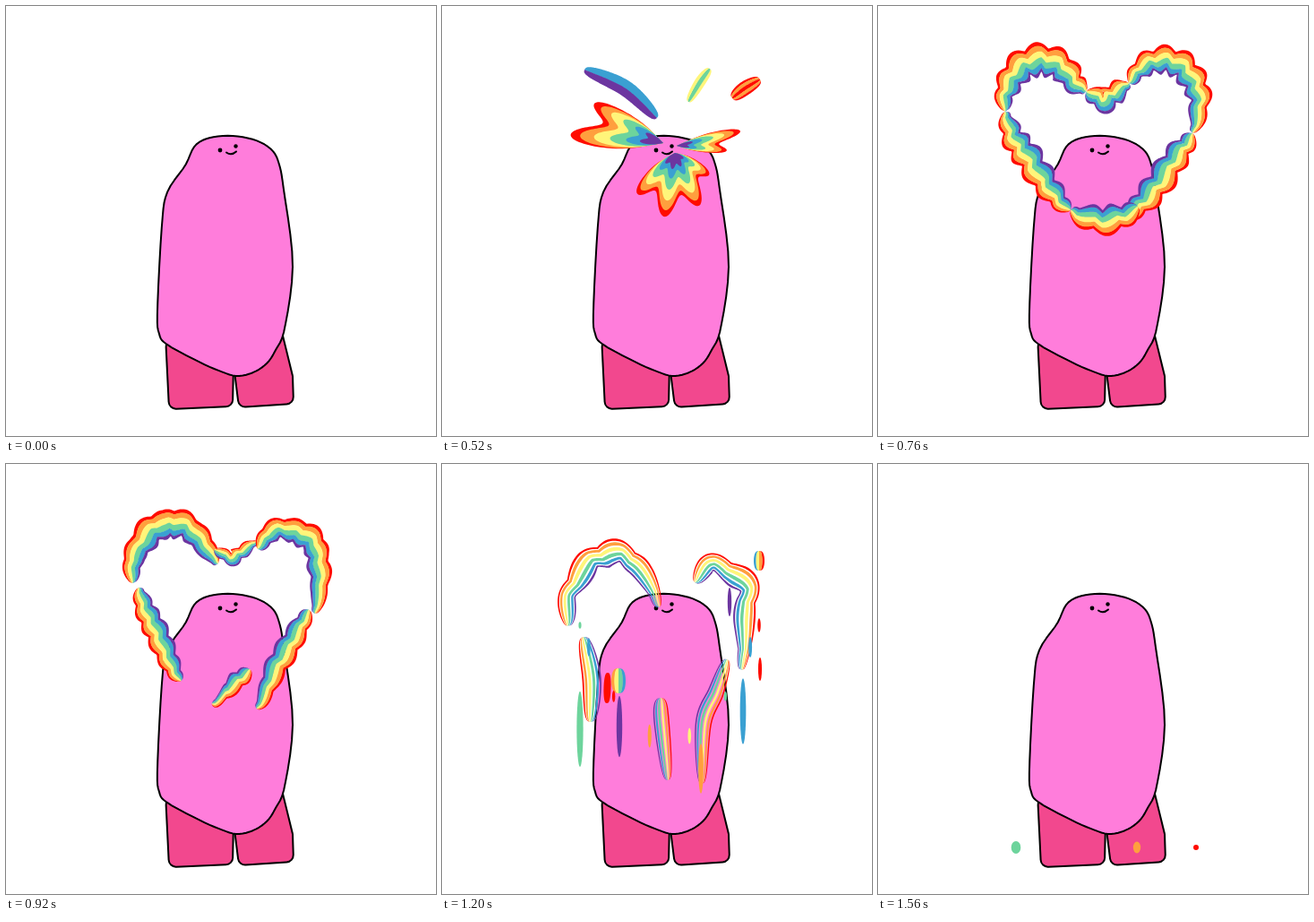
An HTML page with a canvas for the animation above (1640 ms loop, 480 by 480 pixels).

```html
<!DOCTYPE html>
<html lang="en">
<head>
<meta charset="utf-8">
<title>Rainbow heart</title>
<style>
  html, body { margin: 0; width: 100%; height: 100%; overflow: hidden; background: #fff; }
  canvas { display: block; }
</style>
</head>
<body>
<canvas id="stage" width="480" height="480"></canvas>
<script>
const ctx = document.getElementById('stage').getContext('2d');
const LOOP = 1640, STEP = 40, N = 100;
const RED = '#ff0c00', ORANGE = '#ff9f3e', YELLOW = '#fff57a',
      GREEN = '#6dd49c', BLUE = '#3aa0d2', PURPLE = '#6c35a0', PINK = '#ff7ddb';
const RAINBOW = [RED, ORANGE, YELLOW, GREEN, BLUE, PURPLE];

const { PI, sin, cos } = Math;
const clamp = v => Math.max(0, Math.min(1, v));
const ramp = (t, a, b) => clamp((t - a) / (b - a));
const ease = v => v * v * (3 - 2 * v);
const mix = (a, b, k) => a + (b - a) * k;
const mixPoints = (a, b, k) => a.map((p, i) => [mix(p[0], b[i][0], k), mix(p[1], b[i][1], k)]);
const pairs = flat => flat.flatMap((v, i) => i % 2 ? [] : [[v, flat[i + 1]]]);
// Stripe borders: the outermost stripes are the thinnest
const border = f => mix(f, ease(f), .5);

// Catmull-Rom curve between two positions counted in key points
function spline(points, closed = false, from = 0, to = points.length - !closed) {
  const count = points.length;
  const key = i => points[closed ? (i + count) % count : Math.max(0, Math.min(count - 1, i))];
  return Array.from({ length: N + 1 }, (_, k) => {
    const u = mix(from, to, k / N), i = Math.floor(u), f = u - i;
    const [a, b, c, d] = [i - 1, i, i + 1, i + 2].map(key);
    return [0, 1].map(j => b[j] + f / 2 * (c[j] - a[j] + f * (2 * a[j] - 5 * b[j] + 4 * c[j] - d[j]
      + f * (3 * (b[j] - c[j]) + d[j] - a[j]))));
  });
}

function shape(points, fill, stroke) {
  ctx.beginPath();
  points.forEach(p => ctx.lineTo(...p));
  ctx.closePath();
  ctx.fillStyle = fill;
  ctx.fill();
  if (stroke) ctx.stroke();
}

function rounded(points, radius, fill) {
  const last = points[points.length - 1];
  ctx.beginPath();
  ctx.moveTo((points[0][0] + last[0]) / 2, (points[0][1] + last[1]) / 2);
  points.forEach((p, i) => ctx.arcTo(...p, ...points[(i + 1) % points.length], radius));
  ctx.closePath();
  ctx.fillStyle = fill;
  ctx.fill();
  ctx.stroke();
}

function oval(x, y, rx, ry, fill) {
  ctx.beginPath();
  ctx.ellipse(x, y, rx, ry, 0, 0, 2 * PI);
  ctx.fillStyle = fill;
  ctx.fill();
}

// Both edges of a tapered ribbon around a middle line, with optional scallops
function edges(mid, half, scallops = 0) {
  const side = (sign, phase) => mid.map(([x, y], i) => {
    const a = mid[Math.max(0, i - 1)], b = mid[Math.min(N, i + 1)];
    const dx = b[0] - a[0], dy = b[1] - a[1], s = i / N;
    const bump = scallops && 7 * Math.abs(sin(PI * (scallops * s + phase))) - 4;
    const w = sign * Math.max(0, sin(PI * s)) ** .4 * (half + bump) / (Math.hypot(dx, dy) || 1);
    return [x + dy * w, y - dx * w];
  });
  return [side(1, 0), side(-1, .3)];
}

function bands([outer, inner], colors = RAINBOW, fullness = 1) {
  const n = colors.length;
  colors.forEach((color, i) => {
    const from = border((i + .5 - .5 * fullness) / n);
    const to = border(Math.min(1, (i + .5 + .56 * fullness) / n));
    shape([...mixPoints(outer, inner, from), ...mixPoints(outer, inner, to).reverse()], color);
  });
}

const leaf = (flat, half, colors) => bands(edges(spline(pairs(flat)), half), colors);

const BODY = pairs([
  253,145, 228,147, 211,156, 200,178, 180,208, 174,245, 169,340, 171,366, 180,378, 215,397,
  240,408, 258,413, 276,409, 291,399, 301,384, 311,360, 320,288, 310,205, 305,177, 297,161, 279,150]);
const LEGS = [[178,368, 182,450, 253,447, 254,400], [254,400, 260,448, 321,444, 320,413, 306,356]].map(pairs);

// Right half of the heart from the notch to the bottom; the left half mirrors it
const HALF_HEART = pairs([
  252,105, 264,97, 280,86, 295,68, 316,60, 338,66, 353,85, 359,108, 351,142, 333,168, 310,202, 285,228, 252,239]);
const HEART = [...HALF_HEART, ...HALF_HEART.slice(1, -1).reverse().map(([x, y]) => [500 - x, y])];

// A stretch of the heart and the middle line it melts into
function piece(from, to, half, scallops, drip, dripHalf, drops) {
  const mid = spline(HEART, true, from, to);
  return {
    heart: edges(mid, half, scallops),
    drip: drip ? edges(spline(pairs(drip)), dripHalf, drops) : [mid, mid]
  };
}
const PIECES = [
  piece(16.7, 22.8, 17, 7, [140,157, 143,118, 165,86, 190,75, 218,88, 243,136], 14, 4),
  piece(22.8, 26, 13, 3),
  piece(2, 8, 15, 7, [282,108, 300,88, 328,99, 342,120, 337,155, 335,206], 13, 3),
  piece(8, 11.4, 15, 5, [318,194, 306,230, 292,265, 290,333], 10),
  piece(10.8, 13, 15, 3, [244,237, 245,262, 252,329], 9),
  piece(13, 16.7, 15, 6, [166,264, 167,215, 158,169], 11)
];

// A lobed fan; the tilt makes one side longer
function petal(x, y, heading, spread, length, lobes, tilt) {
  const outline = Array.from({ length: N + 1 }, (_, i) => {
    const u = i / N * 2 - 1, angle = (heading + spread * u) * PI / 180;
    const r = length * (1 + tilt * u) * Math.max(0, cos(u * PI / 2)) ** .3 * (.84 - .16 * cos(lobes * PI * u));
    return [x + r * cos(angle), y + r * sin(angle)];
  });
  const base = outline.map(() => [x, y]);
  RAINBOW.forEach((color, i) => shape(mixPoints(outline, base, .85 * border(i / 6)), color));
}

// x, middle, length, color and the radius left on the ground
const LONG_STREAKS = [
  [154, 356, 111, GREEN, 7], [198, 353, 90, PURPLE, 0], [289, 400, 73, ORANGE, 6.5],
  [321, 214, 42, PURPLE, 0], [336, 336, 97, BLUE, 0], [355, 289, 34, RED, 3]
];
const SHORT_STREAKS = Array.from({ length: 8 }, (_, i) => {
  const a = PI * i / 7;
  return [254 - 100 * cos(a), 240 + 130 * sin(a) ** 2, 10 + i * 5 % 8 * 3.4, RAINBOW[(i + 3) % 5], 0];
});
const STREAKS = [...LONG_STREAKS, ...SHORT_STREAKS];

function scaleAbout(x, y, k) {
  ctx.translate(x, y);
  ctx.scale(k, k);
  ctx.translate(-x, -y);
}

function drawMouth(size, fill) {
  ctx.save();
  scaleAbout(256, 160, size);
  const heart = new Path2D('M252 171C246 161 246 142 259 141C266 141 270 145 271 149C277 140 293 140 294 152C294 164 276 170 266 171Z');
  ctx.fillStyle = PINK;
  ctx.fill(heart);
  ctx.save();
  ctx.clip(heart);
  ctx.beginPath();
  ctx.arc(259, 162, 12.5 * fill, 0, 2 * PI);
  ctx.clip();
  ctx.translate(259, 161);
  ctx.rotate(.65);
  RAINBOW.forEach((color, i) => {
    ctx.fillStyle = color;
    ctx.fillRect(-12 + i * 4, -20, 4.5, 40);
  });
  ctx.restore();
  ctx.stroke(heart);
  ctx.restore();
}

function drawCharacter(t) {
  const lean = ease(ramp(t, 40, 280)) * (1 - ease(ramp(t, 360, 480)));
  // The higher a point, the further it stretches up and to the right
  const bend = ([x, y]) => {
    const height = clamp((380 - y) / 235);
    return [x + lean * (3 * ramp(y, 450, 390) + 13 * height), y - lean * 13 * height ** 2];
  };
  ctx.strokeStyle = '#000';
  ctx.lineWidth = 2;
  ctx.lineJoin = ctx.lineCap = 'round';
  LEGS.forEach(leg => rounded(leg.map(bend), 8, '#f2488e'));
  shape(spline(BODY.map(bend), true), PINK, true);
  oval(mix(239, 243, lean), mix(161, 149, lean), 2.4, 2.4, '#000');
  oval(mix(256.5, 250, lean), mix(156.5, 142, lean), 2.2, 2.2, '#000');
  if (t >= 160 && t < 440) {
    drawMouth(lean, ramp(t, 200, 320));
  } else {
    ctx.beginPath();
    ctx.moveTo(246, 163.5);
    ctx.quadraticCurveTo(251.5, 167.5, 257, 162.5);
    ctx.stroke();
  }
}

function drawBurst(t) {
  ctx.save();
  scaleAbout(254, 158, Math.sqrt(ramp(t, 360, 520)));
  petal(247, 153, 198, 28, 105, 2, -.18);
  petal(260, 164, 82, 70, 70, 4, .22);
  petal(262, 156, -3, 21, 70, 2, -.3);
  leaf([159,71, 205,92, 240,125], 9, [BLUE, PURPLE]);
  leaf([299,70, 288,85, 275,107], 6, [YELLOW, GREEN, YELLOW]);
  leaf([324,103, 338,92, 355,82], 8, [RED, ORANGE, RED, ORANGE, RED]);
  ctx.restore();
}

function drawHeart(t) {
  const melt = ease(ramp(t, 800, 1080)), late = ramp(t, 1080, 1240);
  ctx.save();
  scaleAbout(250, 158, mix(.82, 1, ramp(t, 560, 600)));
  ctx.translate(0, late * 32);
  for (const { heart, drip } of PIECES) {
    bands(heart.map((edge, i) => mixPoints(edge, drip[i], melt)), RAINBOW, 1 - late * .5);
  }
  if (t >= 1000) {
    leaf([354,73, 354,95], 6, [RED, ORANGE, YELLOW, BLUE]);
    leaf([185,209, 184,243], 4, [RED]);
    leaf([197,204, 197,232], 8, [BLUE, GREEN, YELLOW, ORANGE]);
  }
  ctx.restore();
}

function drawStreaks(t) {
  const grow = ramp(t, 1160, 1360), fall = ramp(t, 1360, 1560);
  for (const [x, middle, length, color, rest] of STREAKS) {
    const end = rest ? 428 : Math.min(428, middle + 100);
    const y = mix(middle - 75 * (1 - grow), end, fall);
    const half = Math.max(rest, length / 2 * (1 - fall)) * mix(.7, 1, grow);
    const width = (2 + length * .03) * mix(.6, 1, grow) * (rest ? 1 : Math.sqrt(1 - fall));
    if (half > .5) oval(x, y, Math.min(width, half), half, color);
  }
}

function draw(now) {
  const t = Math.min(1560, Math.floor(now % LOOP / STEP) * STEP);
  ctx.fillStyle = '#fff';
  ctx.fillRect(0, 0, 480, 480);
  drawCharacter(t);
  if (t >= 400 && t < 560) drawBurst(t);
  if (t >= 560 && t < 1240) drawHeart(t);
  if (t >= 1200) drawStreaks(t);
}

const start = performance.now();
function tick() {
  draw(performance.now() - start);
  requestAnimationFrame(tick);
}
tick();
</script>
</body>
</html>
```
